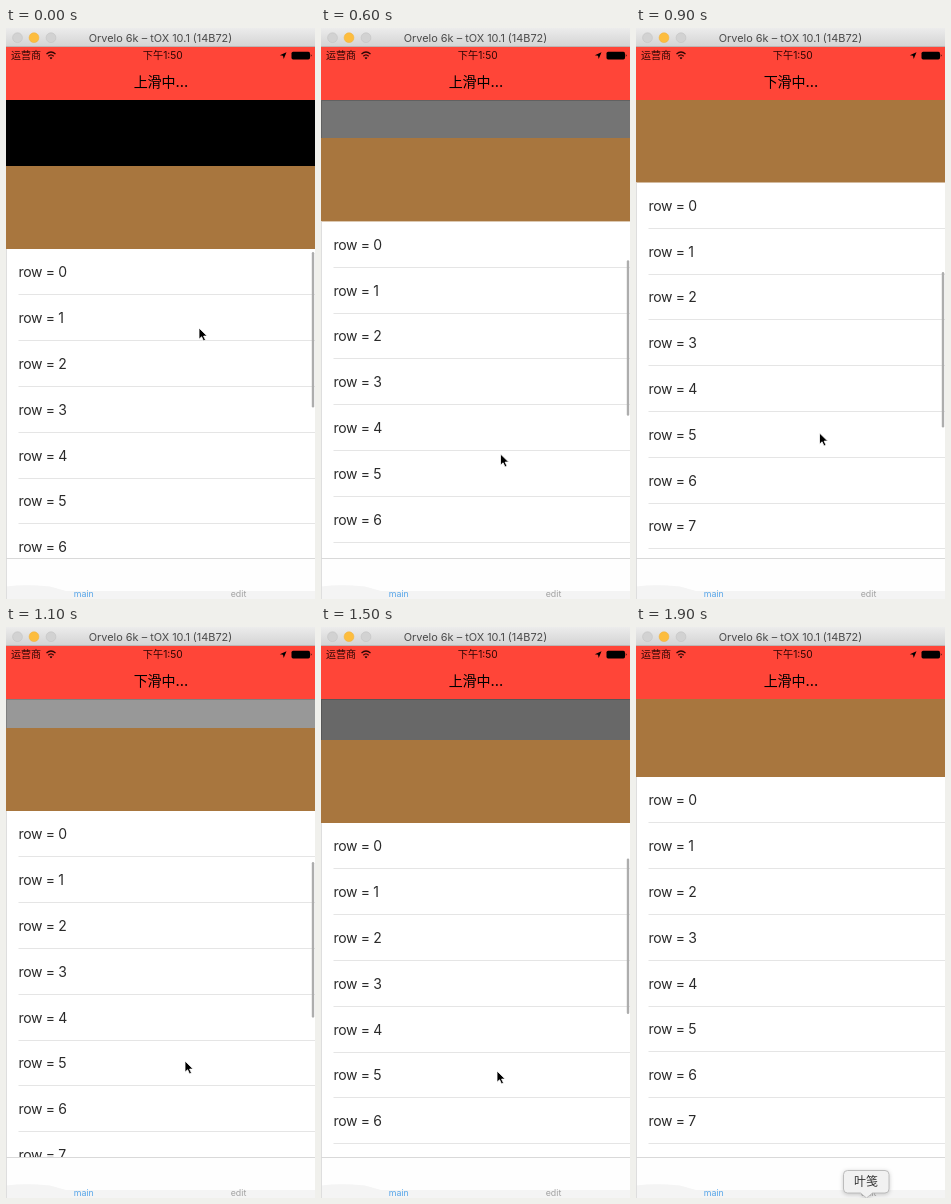
Animation, 309 px wide and 571 px high, one loop 2 s. Source, as an HTML page:

```html
<!DOCTYPE html>
<html lang="zh">
<head>
<meta charset="utf-8">
<title>Scroll header</title>
<style>
  html, body { margin: 0; width: 100%; height: 100%; overflow: hidden; background: #fff; }
  svg { display: block; width: 309px; height: 571px; font-family: Inter, "Noto Sans CJK SC", "Noto Sans CJK", sans-serif; }
  .row { font-size: 14px; letter-spacing: -.35px; fill: #2a2a2a; }
  .mid { text-anchor: middle; }
</style>
</head>
<body>
<svg viewBox="0 0 309 571">
  <defs>
    <linearGradient id="bar" x2="0" y2="1">
      <stop stop-color="#ececec"/><stop offset="1" stop-color="#d3d3d3"/>
    </linearGradient>
    <clipPath id="page"><rect y="72" width="309" height="458"/></clipPath>
  </defs>
  <rect width="309" height="571" fill="#fff"/>

  <g clip-path="url(#page)">
    <rect id="cover" y="72" width="309"/>
    <path id="coverEdge" fill="none" stroke="#000" stroke-opacity=".16"/>
    <rect id="band" width="309" fill="#a8763e"/>
    <g id="rows"></g>
    <rect id="edge" width="1" height="460" fill="#dedede"/>
    <rect id="thumb" x="305.8" width="2.4" height="155.5" rx="1.2" fill="#adadad"/>
  </g>

  <rect y="19" width="309" height="53" fill="#ff4538"/>
  <rect width="309" height="19" fill="url(#bar)"/>
  <rect y="18" width="309" height="1" fill="#bdb5b4"/>
  <g stroke-width=".6">
    <circle cx="11.5" cy="9.7" r="4.9" fill="#d2d2d2" stroke="#c3c3c3"/>
    <circle cx="28" cy="9.7" r="4.9" fill="#fdbd3e" stroke="#f0b443"/>
    <circle cx="45" cy="9.7" r="4.9" fill="#d2d2d2" stroke="#c3c3c3"/>
  </g>
  <text class="mid" x="154.5" y="13.6" font-size="10.9" fill="#4a4a4a">Orvelo 6k – tOX 10.1 (14B72)</text>

  <g fill="#2c0604">
    <text x="5" y="31" font-size="10">运营商</text>
    <text class="mid" x="156.8" y="31" font-size="10.2">下午1:50</text>
  </g>
  <path d="M40.5 26Q45 22 49.5 26M42.3 28.2Q45 25.6 47.7 28.2" fill="none" stroke="#2c0604" stroke-width="1.2"/>
  <path d="M43.5 29.8Q45 28.5 46.5 29.8L45 31.3Z"/>
  <path d="M280.5 24.3L277.7 31L277 27.8L273.8 27.2Z"/>
  <rect x="285.5" y="23.8" width="18.5" height="7.6" rx="1.6"/>
  <path d="M304.8 26Q306.6 27.5 304.8 29Z"/>
  <text id="title" class="mid" x="155" y="58.7" font-size="14" font-weight="500"></text>

  <rect y="530" width="309" height="1" fill="#d9d9d9"/>
  <rect y="531" width="309" height="40" fill="#fefefe"/>
  <path d="M0 571V558.5Q20 556 44 558.5L60 563H309V571Z" fill="#f4f4f4"/>
  <rect y="531" width="1" height="40" fill="#dedede"/>
  <g class="mid" font-size="8.8">
    <text x="77.8" y="569" fill="#55a4e8">main</text>
    <text x="232.5" y="569" fill="#a2a2a2">edit</text>
  </g>

  <g id="tip">
    <path d="M211.5 543.5H249Q253 543.5 253 547.5V562Q253 566 249 566H236.5L230.5 571L224.5 566H211.5Q207.5 566 207.5 562V547.5Q207.5 543.5 211.5 543.5Z"
      fill="#f1f1f1" stroke="#bcbcbc" style="filter:drop-shadow(0 1px 2px #0003)"/>
    <text class="mid" x="230" y="558.5" font-size="12" fill="#333">叶笺</text>
  </g>
  <path id="pointer" d="M0 0V11.2L2.6 8.8L4.5 13L6.5 12.1L4.6 8.1H8.2Z" fill="#000" stroke="#fff" stroke-width=".8"/>
</svg>
<script>
  const STEP = 100, PITCH = 45.8, REST = 221, NAV = 72;
  // list top, pointer x, pointer y for each step
  const poses = [
    [221, 193, 300], [221, 188, 338], [221, 181, 390], [221.5, 176, 440], [222, 175, 454],
    [210.5, 177, 443], [193.4, 179.5, 426], [172, 182, 410], [153, 184, 402], [154.5, 183.5, 405],
    [166, 183, 416], [184, 179, 434], [200, 175, 450], [209, 173, 457], [208.8, 172.5, 457],
    [196, 176, 444], [181, 179, 428], [167.2, 181, 412], [155, 200, 490], [150, 233, 580]
  ];
  const $ = id => document.getElementById(id);
  const set = (el, attrs) => { for (const k in attrs) el.setAttribute(k, attrs[k]); };
  const add = (tag, attrs, text = '') => {
    const el = document.createElementNS('http://www.w3.org/2000/svg', tag);
    set(el, attrs);
    el.textContent = text;
    $('rows').append(el);
    return el;
  };

  const rows = Array.from({ length: 9 }, (_, i) => ({
    label: add('text', { class: 'row', x: 12.5 }, `row = ${i}`),
    line: add('rect', { x: 12.5, width: 297, height: 1, fill: '#e5e5e5' })
  }));

  function draw(step) {
    const [top, x, y] = poses[step];
    const last = poses.length - 1;
    const bandEnd = Math.min(top, REST);
    const bandTop = Math.round(bandEnd - 83);
    const height = Math.max(0, bandTop - NAV);
    const shade = Math.round(255 * (1 - (height / 66) ** 1.1));
    set($('cover'), { height, fill: `rgb(${shade},${shade},${shade})` });
    set($('coverEdge'), { d: height > 1 ? `M.5 ${bandTop}V72.5H309` : '' });
    set($('band'), { y: bandTop, height: bandEnd - bandTop });
    set($('edge'), { y: top });
    rows.forEach(({ label, line }, i) => {
      set(label, { y: top + i * PITCH + 28.3 });
      set(line, { y: Math.floor(top + (i + 1) * PITCH) });
    });
    set($('thumb'), { y: 224 + (REST - bandEnd) * .3, opacity: step === last ? 0 : 1 });
    $('title').textContent = (step >= 9 && step <= 13 ? '下' : '上') + '滑中...';
    set($('pointer'), { transform: `translate(${x} ${y})` });
    set($('tip'), { visibility: step === last ? 'visible' : 'hidden' });
  }

  const start = performance.now();
  let shown = -1;
  function tick() {
    const step = Math.floor((performance.now() - start) / STEP) % poses.length;
    if (step !== shown) draw(shown = step);
    requestAnimationFrame(tick);
  }
  tick();
</script>
</body>
</html>
```
